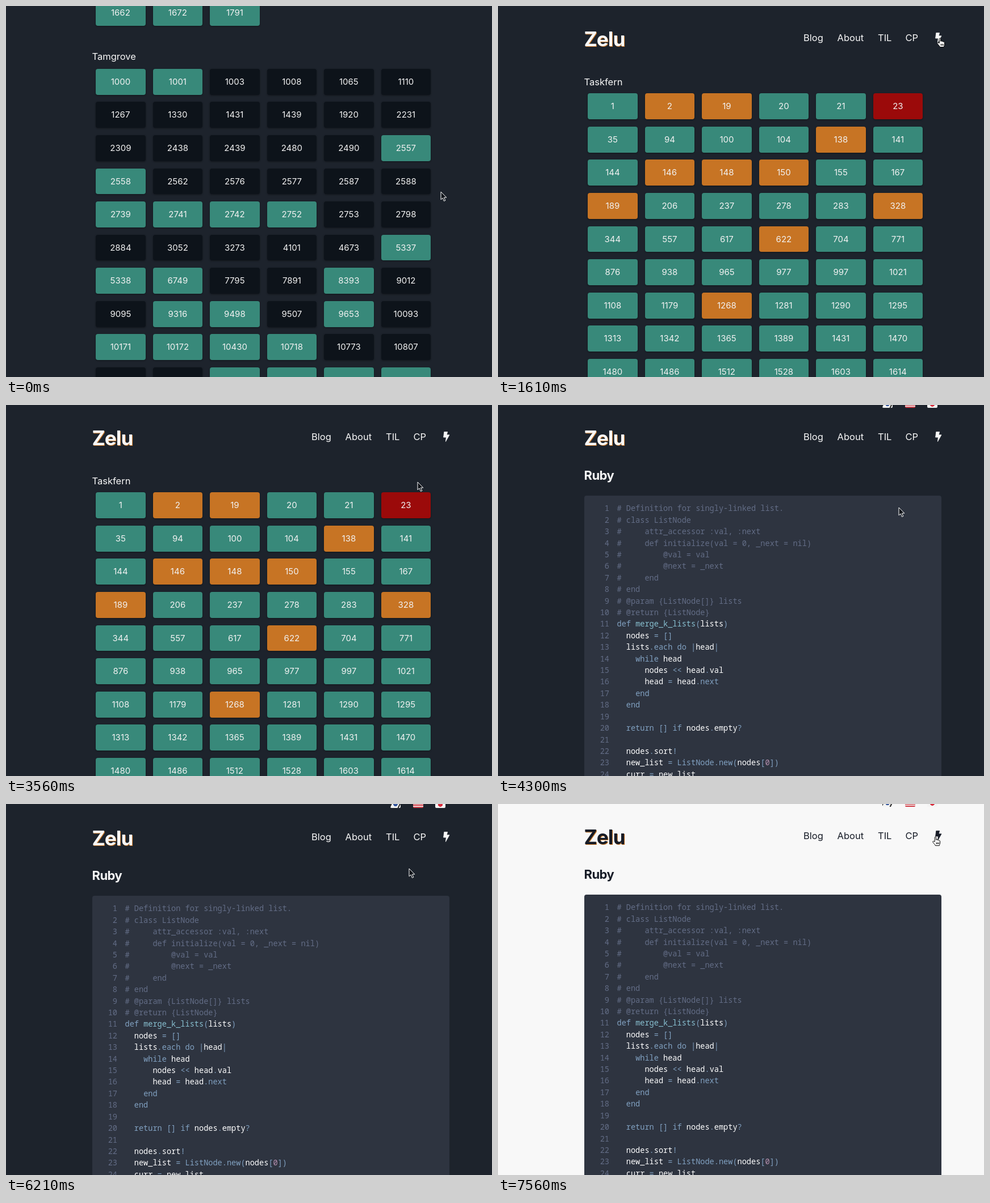
Animation of 856 by 655 pixels, one loop 8 s. Source, as an HTML page:

```html
<!DOCTYPE html>
<html lang="en">
<head>
<meta charset="utf-8">
<title>Problem list</title>
<style>
@property --light { syntax: "<percentage>"; inherits: true; initial-value: 0%; }

html, body { margin: 0; width: 100%; height: 100%; overflow: hidden; }
body {
  --bg: color-mix(in srgb, #f8f8f8 var(--light), #1d232c);
  --fg: color-mix(in srgb, #171c27 var(--light), #f7f7f7);
  --shadow: color-mix(in srgb, #0009 var(--light), #0006);
  position: relative;
  background: var(--bg);
  color: var(--fg);
  font: 16.5px/24px Inter, sans-serif;
  animation: theme 8s step-end infinite;
}
#page, #page *, #cursor, #cursor svg { position: absolute; }
#page { inset: 0; animation: scroll 8s step-end infinite; }
#list { animation: list 8s step-end infinite; }
#article { animation: article 8s step-end infinite; }
#page .label { left: 151.5px; white-space: nowrap; }

h1, h2 { margin: 0; left: 151.5px; letter-spacing: -.025em; font-weight: 700; }
h1 { top: 36px; font-size: 35px; line-height: 44px; text-shadow: 1px 1px #c77424; }
h2 { top: 110px; font-size: 22px; line-height: 28px; }
nav span { top: 44px; }
.bolt { left: 770px; top: 46.5px; fill: var(--fg); stroke: var(--fg); stroke-linejoin: round; overflow: visible; }

.cell {
  width: 87.6px; height: 45.8px;
  border-radius: 4px;
  background: #0d131a;
  color: #f2f2f2;
  font-size: 15px; line-height: 45.8px; text-align: center;
  box-shadow: 0 1px 3px var(--shadow);
}
.e { background: #38897a; }
.m { background: #c77424; }
.h { background: #9b0a0a; }

.flag { top: -8px; width: 18px; height: 13px; border-radius: 2px; overflow: hidden; background: #f4f4f4; }
.korea { background: radial-gradient(circle, #35569c 0 3.5px, #0000 4px), linear-gradient(115deg, #f4f4f4 12%, #333 14% 22%, #f4f4f4 24% 76%, #333 78% 86%, #f4f4f4 88%); }
.usa { background: repeating-linear-gradient(#d0424c 0 2px, #f0d4d5 2px 3.6px); }
.japan { background: radial-gradient(circle, #d92c3c 0 4px, #f4f4f4 4.5px); }

#code {
  left: 152px; top: 159.5px; width: 629px; height: 680px;
  border-radius: 4px;
  background: #2e3440;
  color: #fff;
  font: 500 13.6px/20.4px "Noto Sans Mono", monospace;
  white-space: pre;
}
#page #code .line { left: 57.5px; }
#page #code .line span { position: static; }
#code .num { left: 0; width: 44px; text-align: right; }
#code .num, #code .comment { color: #636d86; }
#code .key { color: #81a1c1; }
#code .fn { color: #88c0d0; }
#code .digit { color: #b48ead; }

#cursor { left: 0; top: 0; animation: move 8s step-end infinite; }
#cursor svg { overflow: visible; stroke-linejoin: round; }
#arrow { left: -.5px; top: -.5px; fill: #10141a; stroke: #fff; animation: arrow 8s step-end infinite; }
#hand { left: -5px; top: -1px; fill: #fff; stroke: #000; animation: hand 8s step-end infinite; }

@keyframes theme {
  0% { --light: 0%; }
  25.75% { --light: 25%; }
  27.625% { --light: 75%; }
  29.5% { --light: 100%; }
  40.75% { --light: 70%; }
  42.625% { --light: 20%; }
  44.5% { --light: 0%; }
  88.875% { --light: 10%; }
  90.75% { --light: 45%; }
  92.625% { --light: 85%; }
  94.5% { --light: 100%; }
}
@keyframes scroll {
  0% { transform: translateY(-692px); }
  1.875% { transform: translateY(-400px); }
  3.75% { transform: translateY(-90px); }
  5.625% { transform: translateY(12px); }
  7.375% { transform: translateY(4px); }
  9.25% { transform: translateY(1px); }
  11% { transform: translateY(0); }
  64.75% { transform: translateY(-6px); }
  66.625% { transform: translateY(-28px); }
  68.375% { transform: translateY(-75px); }
  70.25% { transform: translateY(-110px); }
  72.125% { transform: translateY(-92px); }
  74% { transform: translateY(-48px); }
  75.75% { transform: translateY(-12px); }
  77.625% { transform: translateY(2px); }
  79.5% { transform: translateY(0); }
}
@keyframes list { 0% { visibility: visible; } 51.875% { visibility: hidden; } }
@keyframes article { 0% { visibility: hidden; } 51.875% { visibility: visible; } }
@keyframes move {
  0% { transform: translate(766px, 328px); }
  9.25% { transform: translate(782px, 235px); }
  11% { transform: translate(794px, 120px); }
  12.875% { transform: translate(784px, 74px); }
  14.625% { transform: translate(772px, 55px); }
  16.5% { transform: translate(774px, 55px); }
  18.375% { transform: translate(776px, 56px); }
  20.125% { transform: translate(778px, 57px); }
  22% { transform: translate(779px, 57px); }
  42.625% { transform: translate(764px, 84px); }
  44.5% { transform: translate(725px, 136px); }
  46.375% { transform: translate(712px, 165px); }
  48.125% { transform: translate(708px, 178px); }
  50% { transform: translate(706px, 181px); }
  57.375% { transform: translate(698px, 186px); }
  59.25% { transform: translate(660px, 201px); }
  61% { transform: translate(610px, 220px); }
  62.875% { transform: translate(578px, 229px); }
  64.75% { transform: translate(569px, 231px); }
  74% { transform: translate(585px, 219px); }
  75.75% { transform: translate(642px, 170px); }
  77.625% { transform: translate(710px, 114px); }
  79.5% { transform: translate(744px, 86px); }
  81.375% { transform: translate(760px, 69px); }
  83.25% { transform: translate(768px, 60px); }
  85.125% { transform: translate(770px, 58px); }
}
@keyframes arrow {
  0%, 42.625%, 51.875% { visibility: visible; }
  14.625%, 46.375%, 83.25% { visibility: hidden; }
}
@keyframes hand {
  0%, 42.625%, 51.875% { visibility: hidden; }
  14.625%, 46.375%, 83.25% { visibility: visible; }
}
</style>
</head>
<body>
<div id="page">
  <h1>Zelu</h1>
  <nav>
    <span style="left:538px">Blog</span>
    <span style="left:597.5px">About</span>
    <span style="left:669px">TIL</span>
    <span style="left:717.5px">CP</span>
    <svg class="bolt" width="12" height="18"><path stroke-width=".8" d="M1.8.4H7.6L6.2 5.8H11L4.4 17.6 5.4 10H.6Z"/></svg>
  </nav>
  <div id="list">
    <div class="label" style="top:121.5px">Taskfern</div>
    <div class="label" style="top:769px">Tamgrove</div>
  </div>
  <div id="article">
    <div class="flag korea" style="left:677px"></div>
    <div class="flag usa" style="left:717px"></div>
    <div class="flag japan" style="left:756px"></div>
    <h2>Ruby</h2>
    <div id="code"></div>
  </div>
</div>
<div id="cursor">
  <svg id="arrow" width="12" height="18"><path d="M0 0V13.8L3.1 10.9 5.4 16.4 7.8 15.4 5.5 10.1H9.8Z"/></svg>
  <svg id="hand" width="14" height="17"><path d="M4.2 9.6V2.2C4.2.5 6.6.5 6.6 2.2V6.4C7 5.2 9 5.4 9.1 6.9 9.6 5.9 11.2 6.2 11.4 7.6 12 6.8 13.5 7.2 13.5 8.8V12C13.5 14 12.4 14.6 12.3 16.5H5.4C5 14.5 2 12.3.9 10.2.2 8.8 2 8 3.1 9.2ZM7.2 10.8V14M9.2 10.8V14M11.2 10.8V14"/></svg>
</div>
<script>
const add = (parent, className, text, style) => {
  const el = document.createElement('div');
  el.className = className;
  el.textContent = text;
  Object.assign(el.style, style);
  return parent.appendChild(el);
};

// A trailing letter on a number selects its colour.
const addGrid = (problems, top, fallback) => problems.trim().split(/\s+/).forEach((problem, i) => {
  const [, number, level] = problem.match(/(\d*)-?(\w?)/);
  add(document.getElementById('list'), `cell ${level || fallback}`, number, {
    left: `${158.1 + (i % 6) * 100.5}px`,
    top: `${top + Math.floor(i / 6) * 58.57}px`
  });
});

addGrid(`
  1 2m 19m 20 21 23h  35 94 100 104 138m 141
  144 146m 148m 150m 155 167  189m 206 237 278 283 328m
  344 557 617 622m 704 771  876 938 965 977 997 1021
  1108 1179 1268m 1281 1290 1295  1313 1342 1365 1389 1431 1470
  1480 1486 1512 1528 1603 1614  1662 1672 1791`, 154.3, 'e');

addGrid(`
  1000e 1001e 1003 1008 1065 1110  1267 1330 1431 1439 1920 2231
  2309 2438 2439 2480 2490 2557e  2558e 2562 2576 2577 2587 2588
  2739e 2741e 2742e 2752e 2753 2798  2884 3052 3273 4101 4673 5337e
  5338e 6749e 7795 7891 8393e 9012  9095 9316e 9498e 9507 9653e 10093
  10171e 10172e 10430e 10718e 10773 10807  - - -e -e -e -e`, 802.8, '');

const source = `# Definition for singly-linked list.
# class ListNode
#     attr_accessor :val, :next
#     def initialize(val = 0, _next = nil)
#         @val = val
#         @next = _next
#     end
# end
# @param {ListNode[]} lists
# @return {ListNode}
def merge_k_lists(lists)
  nodes = []
  lists.each do |head|
    while head
      nodes << head.val
      head = head.next
    end
  end

  return [] if nodes.empty?

  nodes.sort!
  new_list = ListNode.new(nodes[0])
  curr = new_list
  size = nodes.size
  for i in 1...size
    curr.next = ListNode.new(nodes[i])
    curr = curr.next
  end

  new_list
end`;

const token = /(?<comment>^#.*)|(?<key>\b(?:def|do|while|end|return|if|for|in|each|next|ListNode|new)\b|[^\w\s]+)|(?<fn>merge_k_lists)|(?<digit>\b\d+)|\w+/g;
const escapeHtml = text => text.replace(/&/g, '&amp;').replace(/</g, '&lt;');
const highlight = line => line.replace(token, (text, ...rest) => {
  const kind = Object.entries(rest.at(-1)).find(([, match]) => match);
  return kind ? `<span class="${kind[0]}">${escapeHtml(text)}</span>` : text;
});

const code = document.getElementById('code');
source.split('\n').forEach((line, i) => {
  const top = `${12.8 + i * 20.41}px`;
  add(code, 'num', i + 1, { top });
  add(code, 'line', '', { top }).innerHTML = highlight(line);
});
</script>
</body>
</html>
```
